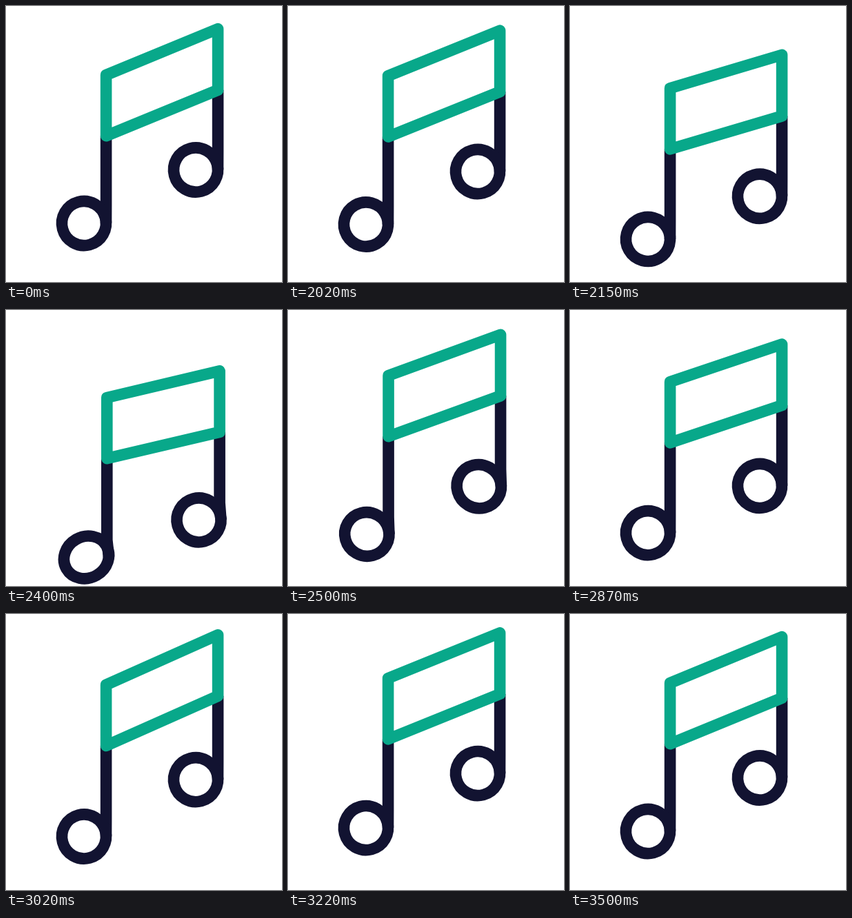
These frames come from a looping animation (400x400 px, 3520 ms). An HTML page:

```html
<!DOCTYPE html>
<html lang="en">
<head>
<meta charset="utf-8">
<title>Music note</title>
<style>
  html, body { margin: 0; width: 100%; height: 100%; overflow: hidden; background: #fff; }
  svg { display: block; width: 100vw; height: 100vh; }
  path, ellipse { fill: none; stroke-width: 16.6; stroke-linejoin: round; }
  .ink { stroke: #121331; }
  .beam { stroke: #08a88a; }
</style>
</head>
<body>
<svg viewBox="0 0 400 400">
  <path id="stemL" class="ink"/>
  <path id="stemR" class="ink"/>
  <ellipse id="headL" class="ink"/>
  <ellipse id="headR" class="ink"/>
  <path id="beam" class="beam"/>
</svg>
<script>
const LOOP = 3520, START = 2020, SWING_FROM = -38, SWING_TO = 1475;

// Vertical bounce given by its turning points [time, offset], joined by half cosine waves.
function swing(...turns) {
  const points = [[SWING_FROM, 0], ...turns, [SWING_TO, 0]];
  return t => {
    const i = points.findIndex(p => p[0] > t);
    if (i < 1) return 0;
    const [t0, y0] = points[i - 1], [t1, y1] = points[i];
    return y0 + (y1 - y0) * (1 - Math.cos(Math.PI * (t - t0) / (t1 - t0))) / 2;
  };
}

// The heads hang on the stems, so they swing wider and turn a little later.
const beamL = swing([290, 38.7], [600, -28.5], [900, 6.5], [1180, -7], [1390, 1]);
const headL = swing([310, 51], [640, -31], [900, 12], [1190, -5], [1390, 1]);
const beamR = swing([290, 76], [570, -23], [815, 17.5], [1090, -9.5], [1380, 2]);
const headR = swing([300, 81], [625, -31], [840, 17.5], [1130, -8], [1390, 1.5]);

const bump = (t, centre, width) => Math.exp(-(((t - centre) / width) ** 2));
const stretch = t => bump(t, 590, 75);
const lean = t => bump(t, 375, 60);
const drift = t => bump(t, 375, 100) + 0.33 * bump(t, 650, 100);

function set(id, attrs) {
  const el = document.getElementById(id);
  for (const name in attrs) el.setAttribute(name, attrs[name]);
}

function drawNote(side, stemX, stemY, cx, cy, squash) {
  const s = Math.abs(squash), tilt = squash < 0 ? -30 : 30;
  const rx = 32 + 3 * s, ry = 32 - 4.5 * s, rad = tilt * Math.PI / 180;
  const reach = Math.hypot(rx * Math.cos(rad), ry * Math.sin(rad));
  set('head' + side, { cx, cy, rx, ry, transform: `rotate(${tilt} ${cx} ${cy})` });
  set('stem' + side, { d: `M${stemX} ${stemY}V${cy - 25}L${cx + reach} ${cy}` });
}

function draw(t) {
  const dx = drift(t), squash = 1.25 * stretch(t);
  const xL = 145.1 + 1.2 * dx, xR = 307.1 + 2.5 * dx;
  const topL = 100 + beamL(t), lowL = 188.2 + beamL(t);
  const topR = 33.2 + beamR(t), lowR = 121.8 + beamR(t);
  drawNote('L', xL, lowL, 113 + 3.5 * dx, 315 + headL(t), squash - 0.45 * lean(t));
  drawNote('R', xR, lowR, 275 + 4.5 * dx, 237.5 + headR(t), squash);
  set('beam', { d: `M${xL} ${topL}L${xR} ${topR}V${lowR}L${xL} ${lowL}Z` });
}

function tick() {
  const t = performance.now() % LOOP - START;
  // Poses last 30 ms and 20 ms in turn.
  const step = 2 * Math.floor(t / 50) + (t % 50 >= 30 ? 1 : 0);
  draw(t < 0 ? SWING_TO : step * 25);
  requestAnimationFrame(tick);
}
tick();
</script>
</body>
</html>
```
